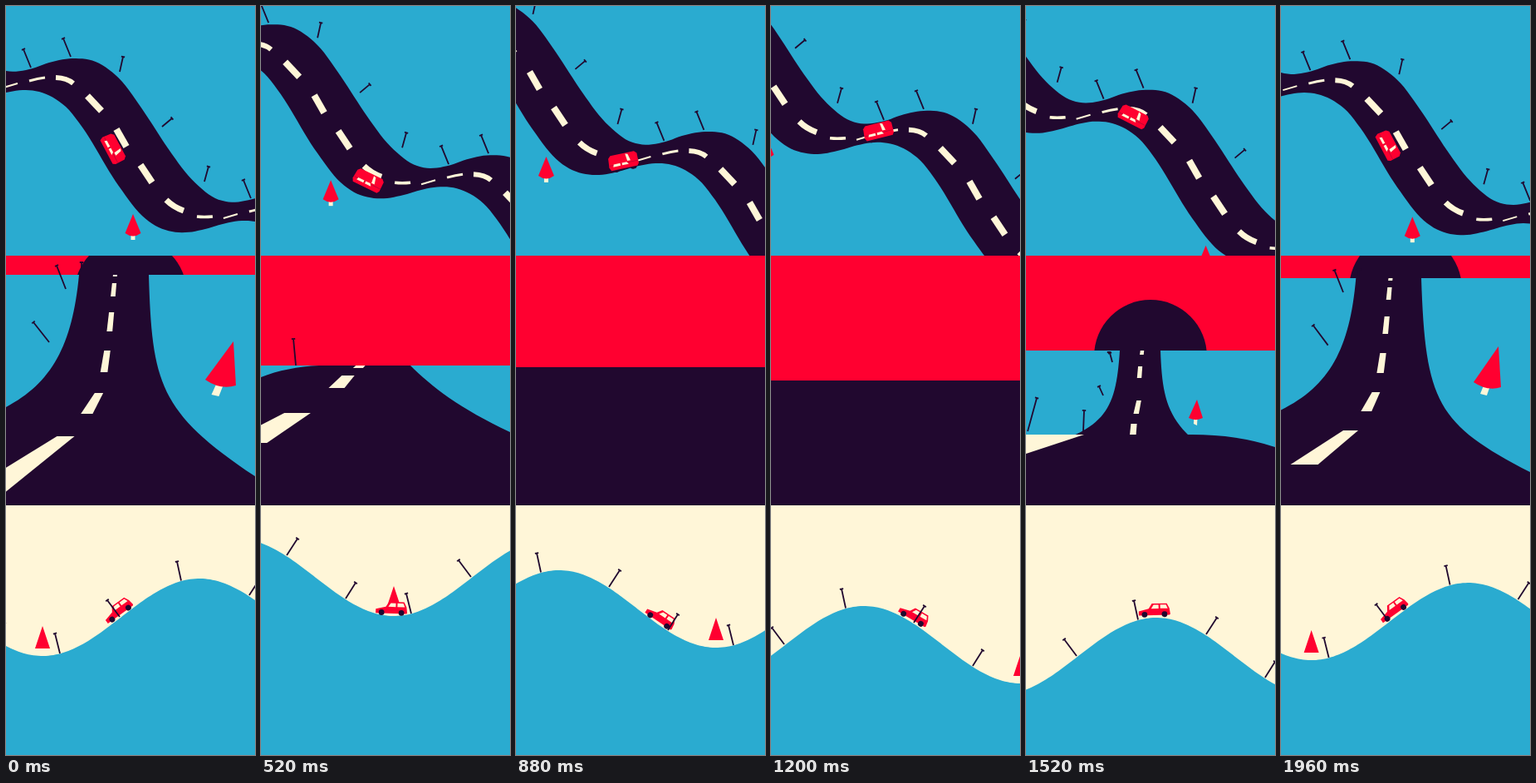
An HTML page with a canvas that plays this animation: 300 by 900 pixels, repeating every 2 s.

```html
<!DOCTYPE html>
<html lang="en">
<head>
<meta charset="utf-8">
<title>Winding road</title>
<style>
html, body { margin: 0; width: 300px; height: 900px; overflow: hidden; }
canvas { display: block; }
</style>
</head>
<body>
<canvas id="stage" width="300" height="900"></canvas>
<script>
const ctx = document.getElementById('stage').getContext('2d');
const BLUE = '#2aabd0', DARK = '#21082f', RED = '#ff0030', CREAM = '#fff6d8';
const LOOP = 2000, STEP = 40, TAU = Math.PI * 2;

// ---- interpolation ----
const smoothSlope = (d0, d1, h0, h1) => (d0 * h1 + d1 * h0) / (h0 + h1);
const calmSlope = (d0, d1) => d0 * d1 > 0 ? 2 * d0 * d1 / (d0 + d1) : 0;

function hermite(keys, u, col, slope) {
  const last = keys.length - 1;
  if (u <= keys[0][0]) return keys[0][col];
  if (u >= keys[last][0]) return keys[last][col];
  let i = 0;
  while (keys[i + 1][0] <= u) i++;
  const h = j => keys[j + 1][0] - keys[j][0];
  const d = j => (keys[j + 1][col] - keys[j][col]) / h(j);
  const m = j => j === 0 ? d(0) : j === last ? d(last - 1) : slope(d(j - 1), d(j), h(j - 1), h(j));
  const s = (u - keys[i][0]) / h(i), s2 = s * s, s3 = s2 * s;
  return keys[i][col] * (2 * s3 - 3 * s2 + 1) + keys[i + 1][col] * (3 * s2 - 2 * s3)
    + h(i) * (m(i) * (s3 - 2 * s2 + s) + m(i + 1) * (s3 - s2));
}

// Curve that repeats every period, shifted by drift each time.
function repeating(keys, period, drift = 0) {
  const all = [-1, 0, 1].flatMap(k => keys.map(([a, b]) => [a + k * period, b + k * drift]));
  return u => {
    const n = Math.floor(u / period);
    return hermite(all, u - n * period, 1, smoothSlope) + n * drift;
  };
}
const track = (keys, u) => keys[0].slice(1).map((_, i) => hermite(keys, u, i + 1, calmSlope));

// ---- drawing helpers ----
function poly(color, ...pts) {
  ctx.fillStyle = color;
  ctx.beginPath();
  for (let i = 0; i < pts.length; i += 2) ctx.lineTo(pts[i], pts[i + 1]);
  ctx.fill();
}
function rect(color, x, y, w, h) {
  ctx.fillStyle = color;
  ctx.fillRect(x, y, w, h);
}
function oval(color, x, y, rx, ry = rx) {
  ctx.fillStyle = color;
  ctx.beginPath();
  ctx.ellipse(x, y, rx, ry, 0, 0, TAU);
  ctx.fill();
}
function post(x, y, tx, ty) {
  const len = Math.hypot(tx - x, ty - y) || 1;
  const nx = -(ty - y) / len * 2.2, ny = (tx - x) / len * 2.2;
  ctx.strokeStyle = DARK;
  ctx.lineWidth = 1.8;
  ctx.beginPath();
  ctx.moveTo(x, y);
  ctx.lineTo(tx, ty);
  ctx.moveTo(tx - nx, ty - ny);
  ctx.lineTo(tx + nx, ty + ny);
  ctx.stroke();
}
function cone(tx, ty, lx, ly, rx, ry, bulge) {
  ctx.fillStyle = RED;
  ctx.beginPath();
  ctx.moveTo(tx, ty);
  ctx.lineTo(lx, ly);
  ctx.quadraticCurveTo((lx + rx) / 2, (ly + ry) / 2 + bulge, rx, ry);
  ctx.fill();
}
function panel(top, color, draw) {
  ctx.save();
  ctx.beginPath();
  ctx.rect(0, top, 300, 300);
  ctx.clip();
  rect(color, 0, top, 300, 300);
  draw();
  ctx.restore();
}

// ---- upper panel: road from above ----
const PX = 265, PY = 157;
const roadTop = repeating([[0, 78], [32, 75], [52, 68], [83, 63], [108, 67], [122, 75],
  [140, 91], [160, 118], [200, 178], [218, 202], [235, 219], [250, 230]], PX, PY);
const roadLow = repeating([[0, 104], [20, 101], [43, 104], [60, 112], [75, 124], [90, 143],
  [135, 215], [165, 253], [180, 264], [200, 271], [218, 272], [240, 268]], PX, PY);
const carPath = repeating([[24, 87], [65, 95], [128, 170], [160, 215], [199, 251], [247, 255]], PX, PY);
const carTurn = repeating([[0, 62], [240, 48], [520, 26], [880, -12], [1200, -14], [1520, 27]], LOOP);
// start, end, width, bend
const lane = [[-3, 98, 14, 93, 2, 0], [28, 90, 47, 86, 3, 1], [60, 86, 81, 93, 6, 3], [98, 108, 115, 126, 8, 0],
  [133, 148, 145, 169, 8, 0], [162, 191, 176, 212, 8, 0], [193, 233, 214, 246, 7, -2], [230, 253, 249, 253, 3.5, -1]];
const topPosts = [[30, 74, 21, 52], [78, 61, 69, 39], [137, 79, 141, 61], [188, 145, 200, 135], [239, 211, 244, 193]];

function topCar(y, turn) {
  ctx.save();
  ctx.translate(129, y);
  ctx.rotate(turn * Math.PI / 180);
  oval(DARK, -10, 9, 4, 3);
  oval(DARK, 11, 9, 4, 3);
  poly(RED, -17, -6, -14, -9, 15, -9, 18, -6, 18, 6, 16, 9, -16, 9, -18, 5);
  rect('#b80633', -17, 2.5, 35, 0.8);
  poly(CREAM, 4, -8, 7, -7, 9, 1, 5, 1);
  poly(CREAM, -12, 2, -4, 2, -4, 5, -13, 5);
  poly(CREAM, -2, 2, 4, 2, 6, 5, -2, 5);
  ctx.restore();
}

function drawTop(t) {
  const sx = PX * t / LOOP, sy = PY * t / LOOP;
  ctx.save();
  ctx.translate(-sx, -sy);
  const edge = [];
  for (let x = -4; x <= 304; x += 4) edge.push(x + sx, roadTop(x + sx));
  for (let x = 304; x >= -4; x -= 4) edge.push(x + sx, roadLow(x + sx));
  poly(DARK, ...edge);
  for (let k = -1; k < 3; k++) {
    ctx.save();
    ctx.translate(k * PX, k * PY);
    for (const [x1, y1, x2, y2, w, b] of lane) {
      ctx.strokeStyle = CREAM;
      ctx.lineWidth = w;
      ctx.beginPath();
      ctx.moveTo(x1, y1);
      ctx.quadraticCurveTo((x1 + x2) / 2 + b, (y1 + y2) / 2 - b, x2, y2);
      ctx.stroke();
    }
    topPosts.forEach(p => post(...p));
    rect(CREAM, 150.5, 274, 5, 7);
    cone(153, 250, 143.5, 273, 162.5, 273, 7);
    ctx.restore();
  }
  ctx.restore();
  topCar(carPath(129 + sx) - sy, carTurn(t));
}

// ---- middle panel: view along the road, heights measured from the horizon ----
const horizonKeys = [[1200, 452], [1520, 414], [1960, 327], [2000, 323], [2240, 323], [2520, 432], [2880, 434], [3200, 452]];
const sunKeys = [[1200, 80], [1520, 7], [1740, -2], [1960, 13], [2000, 23], [2240, 75]];
const crestKeys = [[880, 434, 0], [1200, 450, 0], [1520, 515, 15], [1800, 640, 40]];
// time, then a Bezier from the horizon to the side of the picture
const leftEdge = [[1520, 113, 108, 76, 95, 96, 0, 121], [2000, 88, 80, 85, 55, 130, 0, 159],
  [2240, 72, 55, 20, 30, 65, 0, 93], [2520, 70, 45, 1, 20, 6, 0, 14], [2880, 0, 0, 0, 0, 0, 0, 0]];
const rightEdge = [[1520, 162, 165, 80, 175, 105, 300, 165], [1960, 169, 174, 150, 188, 175, 300, 233],
  [2000, 172, 176, 130, 184, 165, 300, 242], [2240, 177, 185, 65, 200, 145, 300, 220],
  [2520, 180, 205, 25, 240, 52, 300, 80], [2880, 300, 300, 0, 300, 0, 300, 0]];
// time, width and x at the horizon, then y, x along the centre line
const centre = [[1520, 4.5, 140, 33, 136.5, 60, 136, 88, 130, 130, 127],
  [1960, 5, 132, 90, 123, 137, 114.5, 183, 84, 224, 28],
  [2000, 5, 131.5, 91, 122, 142, 112, 194, 72, 277, -47],
  [2240, 7, 127, 35, 117, 87, 105, 167, 62, 252, -35],
  [2520, 11, 121, 12, 105, 27, 91, 57, 44, 93, -17],
  [2880, 11, -60, 10, -220, 30, -400, 60, -550, 120, -700]];
// time, then far and near y of each dash
const spans = [[1520, 88, 101, 60, 76, 19, 33, 0, 5, -6, -2, -15, -10],
  [1960, 183, 224, 137, 160, 90, 114, 46, 67, 11, 26, 0, 3],
  [2000, 194, 277, 142, 167, 91, 117, 45, 68, 10, 26, 0, 2],
  [2240, 300, 420, 167, 252, 87, 123, 35, 59, 6, 18, -6, -1],
  [2520, 400, 500, 200, 330, 57, 93, 12, 27, -1, 3, -9, -5],
  [2880, 500, 600, 300, 400, 60, 120, 10, 40, 0, 10, -5, -2]];
const crestDash = [[1300, -20, 0, -230, 25], [1520, 70, 0, 0, 23], [1700, -40, 25, -180, 70]];
const roadPosts = [
  [[1520, 93, 54, 88, 43], [2000, 52, 81, 33, 57], [2240, 2, 76, -18, 52], [2520, -200, 80, -230, 40]],
  [[1520, 104, 14, 101, 3], [2000, 72, 17, 61, -11], [2240, 51, 9, 40, -22], [2520, -60, 10, -75, -40]],
  [[1900, 100, 4, 100, 2], [2000, 91, -4, 91, -15], [2240, 85, 0, 85, -9], [2520, 42, 0, 39, -32], [2880, -120, 5, -130, -60]],
  [[1520, 69, 97, 70, 72], [1960, -60, 200, -70, 120]],
  [[1520, 2, 97, 13, 57], [1700, -100, 140, -90, 90]]
];
const treeKeys = [[1520, 206, 59, 196, 81, 213, 81, 204, 89], [1960, 262, 82, 232, 125, 265, 131, 244, 140],
  [2000, 274, 80, 240, 126, 277, 133, 252, 145], [2240, 400, 70, 340, 150, 400, 165, 360, 180]];

function drawDashes(u) {
  const [width, x0, ...rest] = track(centre, u);
  const line = [[0, x0]];
  for (let i = 0; i < rest.length; i += 2) line.push([rest[i], rest[i + 1]]);
  // Dashes widen as they swing towards the viewer.
  const ends = y => {
    const x = hermite(line, y, 1, calmSlope), half = (width + 0.27 * Math.abs(x0 - x)) / 2;
    return [x - half, x + half];
  };
  const ys = track(spans, u);
  for (let i = 0; i < ys.length; i += 2) {
    const far = ys[i], near = ys[i + 1];
    const [fl, fr] = ends(far), [nl, nr] = ends(near);
    poly(CREAM, fl, far, fr, far, nr, near, nl, near);
  }
}

function drawMiddle(t) {
  const u = t < 1200 ? t + LOOP : t;
  const [horizon] = track(horizonKeys, u);
  ctx.save();
  ctx.translate(0, horizon);
  oval(DARK, 150, track(sunKeys, u)[0], 68);
  rect(BLUE, 0, 0, 300, 300);

  const [l0, la, lb, lc, ld, le, lf] = track(leftEdge, u);
  const [r0, ra, rb, rc, rd, re, rf] = track(rightEdge, u);
  ctx.fillStyle = DARK;
  ctx.beginPath();
  ctx.moveTo(le, 300);
  ctx.lineTo(le, lf);
  ctx.bezierCurveTo(lc, ld, la, lb, l0, 0);
  ctx.lineTo(r0, 0);
  ctx.bezierCurveTo(ra, rb, rc, rd, re, rf);
  ctx.lineTo(re, 300);
  ctx.fill();

  ctx.save();
  ctx.beginPath();
  ctx.rect(0, 0, 300, 300);
  ctx.clip();
  drawDashes(u);
  ctx.restore();
  roadPosts.forEach(keys => post(...track(keys, u)));

  const [tx, ty, lx, ly, rx, ry, bx, by] = track(treeKeys, u);
  const size = rx - lx, mx = (lx + rx) / 2, my = (ly + ry) / 2, w = size * 0.12;
  poly(CREAM, mx - w, my, mx + w, my, bx + w, by + 1, bx - w, by - 1);
  cone(tx, ty, lx, ly, rx, ry, size * 0.25);
  ctx.restore();

  if (t >= 880 && t < 1800) {
    const [y, fall] = track(crestKeys, t);
    ctx.fillStyle = DARK;
    ctx.beginPath();
    ctx.moveTo(0, 600);
    ctx.lineTo(0, y);
    ctx.lineTo(200, y);
    ctx.quadraticCurveTo(255, y, 300, y + fall);
    ctx.lineTo(300, 600);
    ctx.fill();
    const [fx, fy, nx, ny] = track(crestDash, t);
    poly(CREAM, fx - 130, y + fy, fx, y + fy, nx, y + ny, nx - 110, y + ny);
  }
}

// ---- lower panel: hills from the side ----
const WAVE = 378, AMP = 46.5, K = TAU / WAVE;
const hillX = repeating([[0, 44], [240, 93], [520, 160], [880, 241], [1200, 301], [1520, 346]], LOOP, WAVE);
const hillY = repeating([[0, 734.5], [240, 701.5], [520, 686.5], [880, 724.5], [1200, 767.5], [1520, 781.5]], LOOP);
const sideCarX = repeating([[0, 140], [240, 144], [520, 157], [880, 169.5], [1200, 168], [1520, 155]], LOOP);
const sidePosts = [[167, -44, -5, -23], [93, -0.5, -15, -20], [21, 43.5, -6, -24], [-58, 25.5, 12, -19], [-129, -26.5, 13, -20]];

function sideCar(x, y, turn) {
  ctx.save();
  ctx.translate(x, y);
  ctx.rotate(turn);
  poly(RED, -19, -3, -19, -8, -7, -11, -3, -17, 15, -17, 18, -11, 19, -4, 18, -3);
  poly(CREAM, -4, -11, -1, -15.5, 5, -15.5, 5, -11);
  poly(CREAM, 7, -11, 7, -15.5, 14, -15.5, 16, -11);
  oval(DARK, -12, -4, 3.4);
  oval(DARK, 12, -4, 3.4);
  ctx.restore();
}

function drawSide(t) {
  const x0 = hillX(t), mid = hillY(t), peak = x0 + 189;
  const ground = x => mid - AMP * Math.cos(K * (x - peak));
  const hill = [0, 900];
  for (let x = 0; x <= 300; x += 3) hill.push(x, ground(x));
  poly(BLUE, ...hill, 300, 900);
  for (let k = -2; k < 2; k++) {
    const x = x0 + k * WAVE;
    poly(RED, x, mid + 10.5, x - 9, mid + 37.5, x + 9, mid + 37.5);
  }
  const cx = sideCarX(t);
  sideCar(cx, ground(cx), Math.atan(AMP * K * Math.sin(K * (cx - peak))) * 0.95);
  for (let k = -2; k < 2; k++) {
    for (const [px, py, dx, dy] of sidePosts) {
      const x = x0 + px + k * WAVE, y = mid + py;
      post(x, y, x + dx, y + dy);
    }
  }
}

// ---- clock ----
const start = performance.now();
function frame() {
  const t = Math.floor((performance.now() - start) % LOOP / STEP) * STEP;
  panel(0, BLUE, () => drawTop(t));
  panel(300, RED, () => drawMiddle(t));
  panel(600, CREAM, () => drawSide(t));
  requestAnimationFrame(frame);
}
frame();
</script>
</body>
</html>
```
